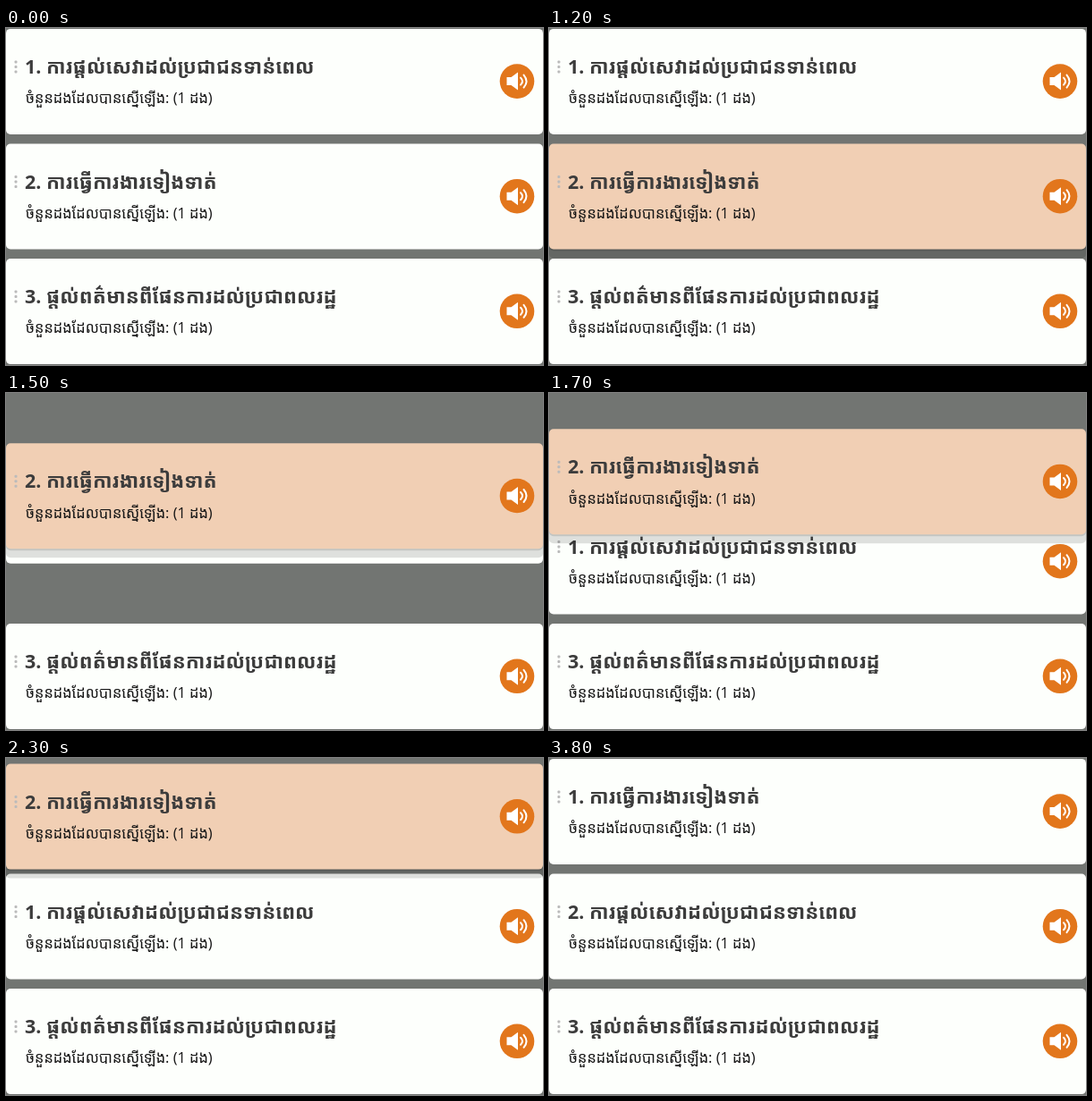
Animation, 600 px wide and 377 px high, one loop 3.9 s. Source, as an HTML page:

```html
<!DOCTYPE html>
<html lang="km">
<head>
<meta charset="utf-8">
<style>
html, body { margin: 0; height: 100%; overflow: hidden; background: #727572; }
svg { display: block; width: 600px; height: 377px; }
text { font-family: "Open Sans", "Noto Sans Khmer", "Noto Sans", sans-serif; }
.label { font-size: 21.5px; font-weight: 700; fill: #3c3c3c; }
.title { font-size: 22.2px; font-weight: 700; }
.sub { font-size: 16.35px; fill: #161616; }
.shadow { fill: #000; fill-opacity: .12; }
</style>
</head>
<body>
<svg id="stage" viewBox="0 0 600 377"></svg>
<script>
const LOOP = 3900, STEP = 100, TOP = .9, PITCH = 128.6;
const titles = [
  'ការផ្តល់សេវាដល់ប្រជាជនទាន់ពេល',
  'ការធ្វើការងារទៀងទាត់',
  'ផ្តល់ពត៌មានពីផែនការដល់ប្រជាពលរដ្ឋ'
];
const stage = document.getElementById('stage');

const cardMarkup = title => `<g>
  <g class="shadow">
    <rect y="10" width="600" height="118" rx="5"/>
    <rect y="2" width="600" height="118" rx="5"/>
  </g>
  <rect class="face" width="600" height="118" rx="5"/>
  <g fill="#bbb">${[35.5, 41, 46.5].map(y => `<rect x="9.5" y="${y}" width="3" height="3" rx="1"/>`).join('')}</g>
  <text class="label" x="21" y="50"><tspan class="num"></tspan>. <tspan class="title">${title}</tspan></text>
  <text class="sub" x="22" y="83.4">ចំនួនដងដែលបានស្នើឡើង: (1 ដង)</text>
  <g transform="translate(571 58.7)">
    <circle r="19.3" fill="#e2761c"/>
    <path d="M-11.5-4.5h5L1-10V10L-6.5 4.5h-5z" fill="#fff"/>
    <path d="M4-4q4 4 0 8M7.5-7q6 7 0 14" fill="none" stroke="#fff" stroke-width="2" stroke-linecap="round"/>
  </g>
</g>`;

// The dragged card comes last so that it lies on top.
stage.innerHTML = [0, 2, 1].map(i => cardMarkup(titles[i])).join('');
const [first, third, dragged] = stage.children;

// Linear interpolation through [time, value] pairs.
function track(keys, t) {
  const i = keys.findIndex(k => k[0] > t);
  if (i === 0) return keys[0][1];
  if (i < 0) return keys[keys.length - 1][1];
  const [t0, a] = keys[i - 1], [t1, b] = keys[i];
  return a + (b - a) * (t - t0) / (t1 - t0);
}

const dragPath = [[1200, TOP + PITCH], [1300, 114], [1500, 56.3], [1600, 46], [1800, 34.5],
  [2000, 29.7], [2100, 29.5], [2300, 6.6], [2400, 2.5], [2600, TOP]];
const makeRoom = [[1300, TOP], [1500, 72.8], [1600, 110], [1700, TOP + PITCH]];
const glow = [[900, 0], [1200, 1]];

function place(card, y, number, lit = 0) {
  card.setAttribute('transform', `translate(0 ${y})`);
  card.querySelector('.num').textContent = number;
  card.querySelector('.shadow').style.opacity = lit;
  const mix = (a, b) => a + (b - a) * lit;
  card.querySelector('.face').setAttribute('fill', `rgb(${mix(253, 241)},${mix(255, 207)},${mix(252, 180)})`);
}

function draw(now) {
  const t = Math.floor(now % LOOP / STEP) * STEP;
  const dropped = t >= 3800;
  place(first, track(makeRoom, t), dropped ? 2 : 1);
  place(third, TOP + 2 * PITCH, 3);
  place(dragged, track(dragPath, t), dropped ? 1 : 2, dropped ? 0 : track(glow, t));
  requestAnimationFrame(draw);
}
draw(performance.now());
</script>
</body>
</html>
```
